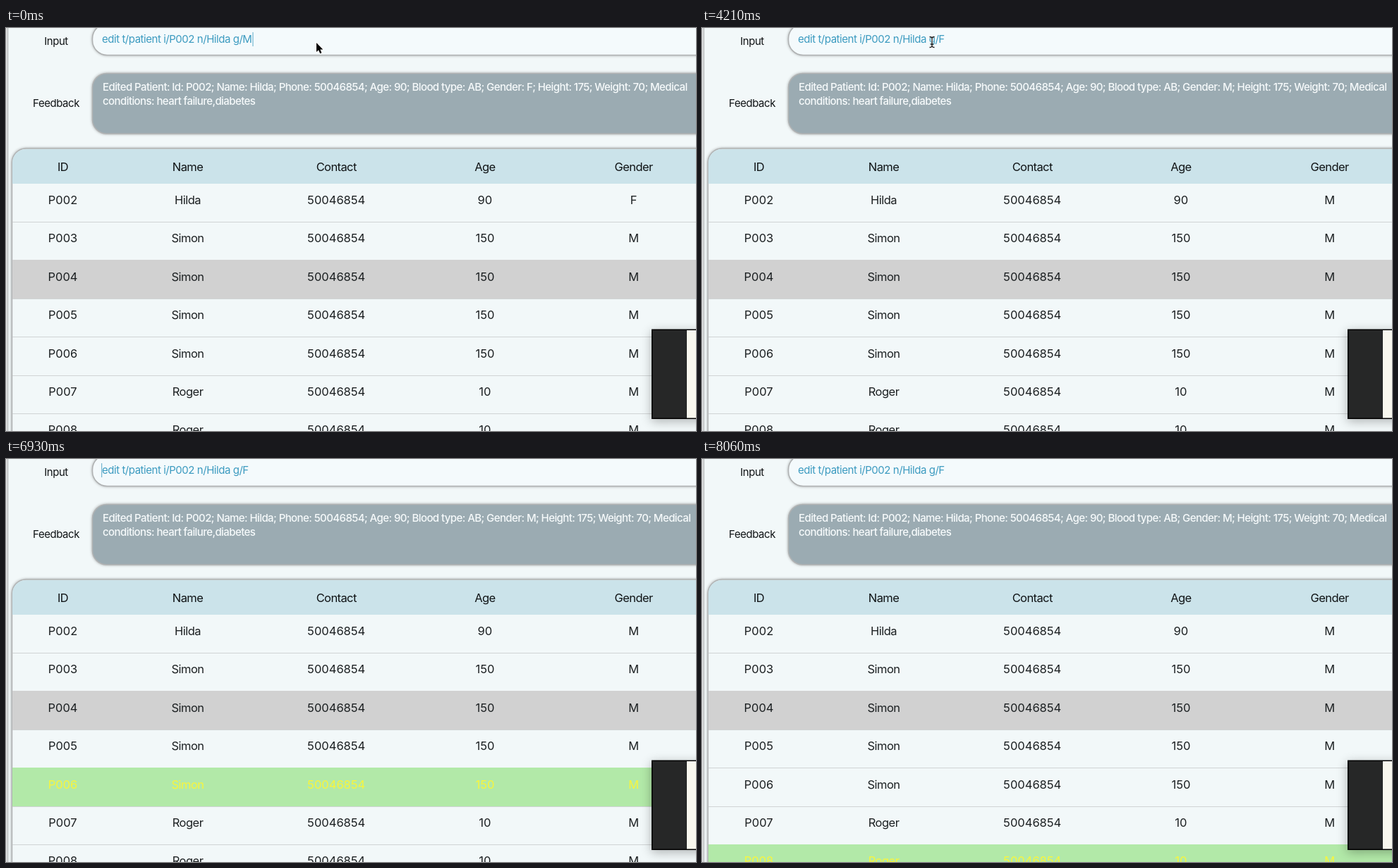
An HTML page with a canvas that plays this animation: 978 px wide and 572 px high, repeating every 8160 ms.

```html
<!DOCTYPE html>
<html lang="en">
<head>
<meta charset="utf-8">
<title>Edit patient</title>
<style>
  html, body { margin: 0; width: 100%; height: 100%; overflow: hidden; background: #f2f8f9; }
  canvas { display: block; }
</style>
</head>
<body>
<canvas id="stage" width="978" height="572"></canvas>
<script>
const ctx = document.getElementById('stage').getContext('2d');
const FONT = 'Inter, Roboto, sans-serif';
const INK = '#101416', BACK = '#f2f8f9';

// Times in ms
const LOOP = 8160, SUBMIT = 720, RECALL = 1880;
const MOVE = 4030, LEAVE = 6660, STEP = 88;
const HOVER = 6840, HOVER_END = 7190, HOVER_AGAIN = 7550;
const BLINK = 985, BLINK_START = 180, BLINK_OFF = 540;

const ROW_TOP = 221, ROW_H = 54.4;
const HEAD = ['ID', 'Name', 'Contact', 'Age', 'Gender'];
const PHONE = '50046854';

// Pointer turning points: [step, x, y]
const PATH = [[0, 410, 20], [2, 326, 20], [7, 150, 34], [11, 375, 30],
  [16, 209, 52], [20, 143, 46], [29, 434, 24]];

const columnX = c => c ? 257.5 + (c - 1) * 210.7 : 80.5;
const rowY = i => Math.floor(ROW_TOP + i * ROW_H);

function person(i) {
  if (i === 0) return ['Hilda', '90'];
  return i < 5 ? ['Simon', '150'] : ['Roger', '10'];
}

function caretOn(t) {
  return (t - BLINK_START + BLINK) % BLINK >= BLINK_OFF;
}

function hoveredRow(t) {
  if (t >= HOVER_AGAIN) return 6;
  return t >= HOVER && t < HOVER_END ? 3 + Math.floor((t - HOVER) / STEP) : -1;
}

function pathAt(n) {
  const i = Math.max(1, PATH.findIndex(k => k[0] >= n));
  const [a, x0, y0] = PATH[i - 1], [b, x1, y1] = PATH[i];
  const u = (n - a) / (b - a);
  return [x0 + (x1 - x0) * u, y0 + (y1 - y0) * u];
}

function text(str, x, y, color, { size = 15, spacing = -0.46, align = 'left', weight = 400 } = {}) {
  ctx.font = `${weight} ${size}px ${FONT}`;
  ctx.letterSpacing = spacing + 'px';
  ctx.textAlign = align;
  ctx.fillStyle = color;
  ctx.fillText(str, x, y);
}

function rect(x, y, w, h, color) {
  ctx.fillStyle = color;
  ctx.fillRect(x, y, w, h);
}

function panel(x, y, w, h, r, fill) {
  ctx.beginPath();
  ctx.roundRect(x, y, w, h, r);
  ctx.save();
  ctx.shadowColor = 'rgba(0,0,0,.45)';
  ctx.shadowBlur = 4;
  ctx.fillStyle = fill;
  ctx.fill();
  ctx.restore();
  ctx.strokeStyle = '#b0b2b3';
  ctx.lineWidth = 1.5;
  ctx.stroke();
}

function drawInput(t) {
  text('Input', 71, 24, INK, { align: 'center' });
  panel(122.5, -6, 900, 44.5, 21, '#f4fafc');
  const typed = t < SUBMIT || t >= RECALL;
  if (typed) text('edit t/patient i/P002 n/Hilda g/' + (t < SUBMIT ? 'M' : 'F'), 136, 21, '#3c9bc0');
  if (caretOn(t)) rect(t < SUBMIT ? 349.5 : 135.2, 6, 1, 20, '#5aa9c9');
}

function drawFeedback(gender) {
  text('Feedback', 71, 112, INK, { align: 'center' });
  panel(122.5, 64.5, 900, 85.5, 20, '#9babb2');
  const lines = [
    `Edited Patient: Id: P002; Name: Hilda; Phone: ${PHONE}; Age: 90; Blood type: AB; ` +
      `Gender: ${gender}; Height: 175; Weight: 70; Medical`,
    'conditions: heart failure,diabetes'
  ];
  lines.forEach((line, i) => text(line, 137, 88.5 + i * 20, '#f6fafb', { weight: 500, spacing: -0.58 }));
}

function drawRow(i, gender, hot) {
  const top = rowY(i), height = rowY(i + 1) - top;
  if (hot) rect(9, top, 969, height, '#b2e9a8');
  else if (i === 2) rect(9, top, 969, height, '#d1d1d1');
  else if (i) rect(9, top, 969, 1, '#d0d4d5');
  const [name, age] = person(i);
  const cells = ['P00' + (i + 2), name, PHONE, age, i ? 'M' : gender];
  cells.forEach((cell, c) => text(cell, columnX(c), 250 + i * ROW_H, hot ? '#f8f53c' : '#1c2022',
    { size: 16.5, spacing: c === 1 ? -0.5 : 0, align: 'center' }));
}

function drawTable(gender, hover) {
  panel(8.5, 171, 1000, 440, 20, BACK);
  ctx.save();
  ctx.beginPath();
  ctx.roundRect(9, 172, 1000, 440, 19);
  ctx.clip();
  rect(9, 172, 969, 49, '#cbe3ea');
  for (let i = 0; i < 7; i++) drawRow(i, gender, i === hover);
  HEAD.forEach((label, c) => text(label, columnX(c), 203, INK,
    { size: 16.5, spacing: -0.6, align: 'center' }));
  ctx.restore();
}

function drawOverlay() {
  ctx.save();
  ctx.shadowColor = 'rgba(0,0,0,.3)';
  ctx.shadowBlur = 14;
  ctx.shadowOffsetY = 3;
  rect(915, 427.5, 90, 127.5, '#000');
  ctx.restore();
  rect(916.5, 429, 48.5, 124.5, '#262727');
  rect(965, 429, 13, 124.5, '#f8f7ee');
}

function drawArrow(x, y) {
  ctx.save();
  ctx.translate(x, y);
  ctx.beginPath();
  [[0, 0], [0, 13], [3, 10.3], [5.2, 15.2], [7.4, 14.2], [5.3, 9.5], [9.3, 9.5]]
    .forEach(p => ctx.lineTo(...p));
  ctx.closePath();
  ctx.lineJoin = 'round';
  ctx.lineWidth = 2;
  ctx.strokeStyle = '#fff';
  ctx.stroke();
  ctx.fillStyle = '#000';
  ctx.fill();
  ctx.restore();
}

function drawBeam(x, y) {
  ctx.beginPath();
  for (const s of [-1, 1]) {
    ctx.moveTo(x - 3.5, y + 7.5 * s);
    ctx.quadraticCurveTo(x, y + 7.5 * s, x, y + 5 * s);
    ctx.quadraticCurveTo(x, y + 7.5 * s, x + 3.5, y + 7.5 * s);
  }
  ctx.moveTo(x, y - 6);
  ctx.lineTo(x, y + 6);
  ctx.moveTo(x - 2, y + 3);
  ctx.lineTo(x + 2, y + 3);
  for (const [width, color] of [[3, 'rgba(255,255,255,.8)'], [1.3, '#1a1a1a']]) {
    ctx.lineWidth = width;
    ctx.strokeStyle = color;
    ctx.stroke();
  }
}

function drawPointer(t) {
  if (t >= LEAVE) return;
  if (t < MOVE) return drawArrow(440, 21);
  const [x, y] = pathAt(Math.min(29, Math.floor((t - MOVE) / STEP)));
  (y > 38 ? drawArrow : drawBeam)(x, y);
}

function draw(t) {
  const gender = t < SUBMIT ? 'F' : 'M';
  rect(0, 0, 978, 572, BACK);
  rect(0, 0, 2, 572, '#dcdedf');
  rect(2, 0, 1, 572, '#b9bbbc');
  rect(3, 0, 1, 572, '#e0e5e6');
  drawInput(t);
  drawFeedback(gender);
  drawTable(gender, hoveredRow(t));
  drawOverlay();
  drawPointer(t);
}

const start = performance.now();
function tick() {
  draw((performance.now() - start) % LOOP);
  requestAnimationFrame(tick);
}
tick();
</script>
</body>
</html>
```
